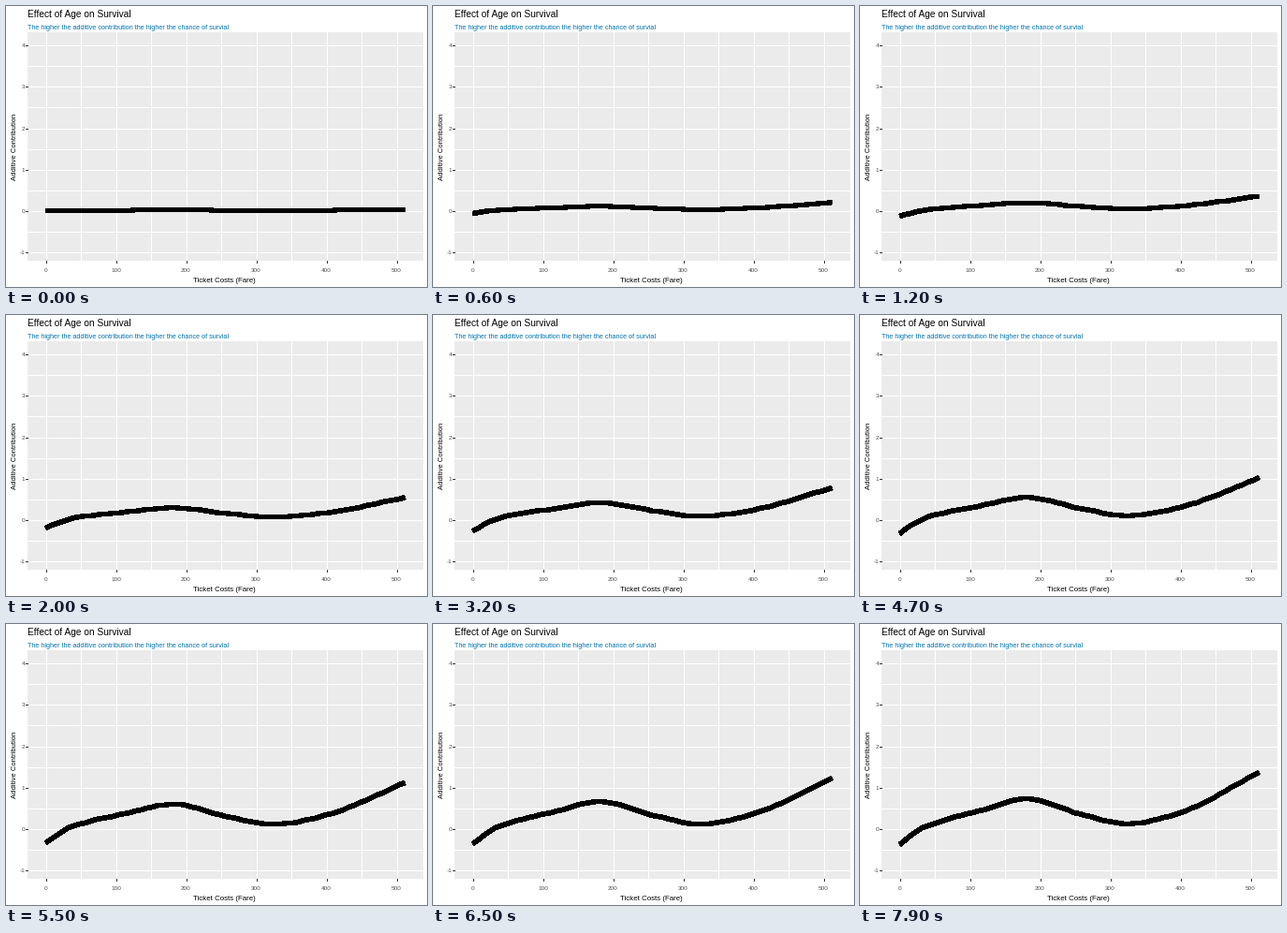
These frames come from a looping animation (450x300 px, 8000 ms). A matplotlib script:

```python
import numpy as np
import matplotlib.pyplot as plt
from matplotlib.animation import FuncAnimation
from matplotlib.patches import Rectangle

W, H, DPI = 450, 300, 100
FRAMES, STEP_MS = 80, 100
LAST = (FRAMES - 1) * STEP_MS / 1000
PX = 72 / DPI  # points per pixel
LEFT, TOP, RIGHT, BOTTOM = 23, 28, 446, 272
X0, X_UNIT = 42, 0.75
Y0, Y_UNIT = 218.1, 44.3
TICK_GREY, LABEL_GREY = "#333333", "#4D4D4D"

plt.rcParams["font.family"] = "Liberation Sans"
fig = plt.figure(figsize=(W / DPI, H / DPI), dpi=DPI, facecolor="white")
ax = fig.add_axes([0, 0, 1, 1])
ax.set_xlim(0, W)
ax.set_ylim(H, 0)
ax.axis("off")


def px(fare):
    return np.round(X0 + fare * X_UNIT - 0.01) + 0.5


def py(value):
    return np.round(Y0 - value * Y_UNIT) + 0.5


def text(x, y, s, size, color="black", **kw):
    ax.text(x, y, s, fontsize=size * PX, color=color, **kw)


def rule(xs, ys, color):
    ax.plot(xs, ys, color=color, lw=PX, solid_capstyle="butt", antialiased=False)


def hermite(x, kx, ky):
    """Smooth curve through the key points."""
    slope = np.gradient(ky, kx)
    i = np.clip(np.searchsorted(kx, x, side="right") - 1, 0, len(kx) - 2)
    h = kx[i + 1] - kx[i]
    s = (x - kx[i]) / h
    return ((1 + 2 * s) * (1 - s) ** 2 * ky[i] + s * (1 - s) ** 2 * h * slope[i]
            + s * s * (3 - 2 * s) * ky[i + 1] + s * s * (s - 1) * h * slope[i + 1])


# Panel, grid and ticks
ax.add_patch(Rectangle((LEFT, TOP), RIGHT - LEFT, BOTTOM - TOP, fc="#EBEBEB", lw=0))
for v in np.arange(-1, 4.1, 0.5):
    rule([LEFT, RIGHT], [py(v)] * 2, "white")
for v in range(0, 501, 50):
    rule([px(v)] * 2, [TOP, BOTTOM], "white")
for v in range(-1, 5):
    rule([LEFT - 2, LEFT], [py(v)] * 2, TICK_GREY)
    text(20.3, py(v) + 0.8, v, 6.4, LABEL_GREY, ha="right", va="center_baseline")
for v in range(0, 501, 100):
    rule([px(v)] * 2, [BOTTOM, BOTTOM + 2], TICK_GREY)
    text(px(v), 284, v, 6.4, LABEL_GREY, ha="center")

# Titles
text(23, 12, "Effect of Age on Survival", 10.1)
text(23, 25, "The higher the additive contribution the higher the chance of survial",
     7.3, "#0072B2")
text(233.3, 295, "Ticket Costs (Fare)", 7.9, ha="center")
text(13.5, 150, "Additive Contribution", 7.7, rotation=90, ha="right", va="center")

# Shape of the effect once fully grown, in data units
fare = np.linspace(0, 512, 65)
effect = hermite(fare,
                 np.array([0, 28, 65, 110, 182, 260, 322, 400, 512]),
                 np.array([-0.39, -0.03, 0.21, 0.41, 0.71, 0.33, 0.115, 0.385, 1.35]))
# Small effects settle sooner than large ones
rate = 0.16 + 0.17 * np.exp(-np.maximum(effect, 0) / 0.25)


def growth(t):
    return 1 - np.exp(-rate * (t + 0.06))


line, = ax.plot([], [], color="black", lw=4.5 * PX, solid_capstyle="butt",
                solid_joinstyle="round", antialiased=False, snap=False, zorder=5)


def draw(i):
    height = effect * growth(i * STEP_MS / 1000) / growth(LAST)
    line.set_data(X0 + 0.5 + fare * X_UNIT,
                  np.round(Y0 - 0.3 - height * Y_UNIT) + 0.5)
    return line,


anim = FuncAnimation(fig, draw, frames=FRAMES, interval=STEP_MS,
                     repeat=True, repeat_delay=0, blit=False)
plt.show()
```
